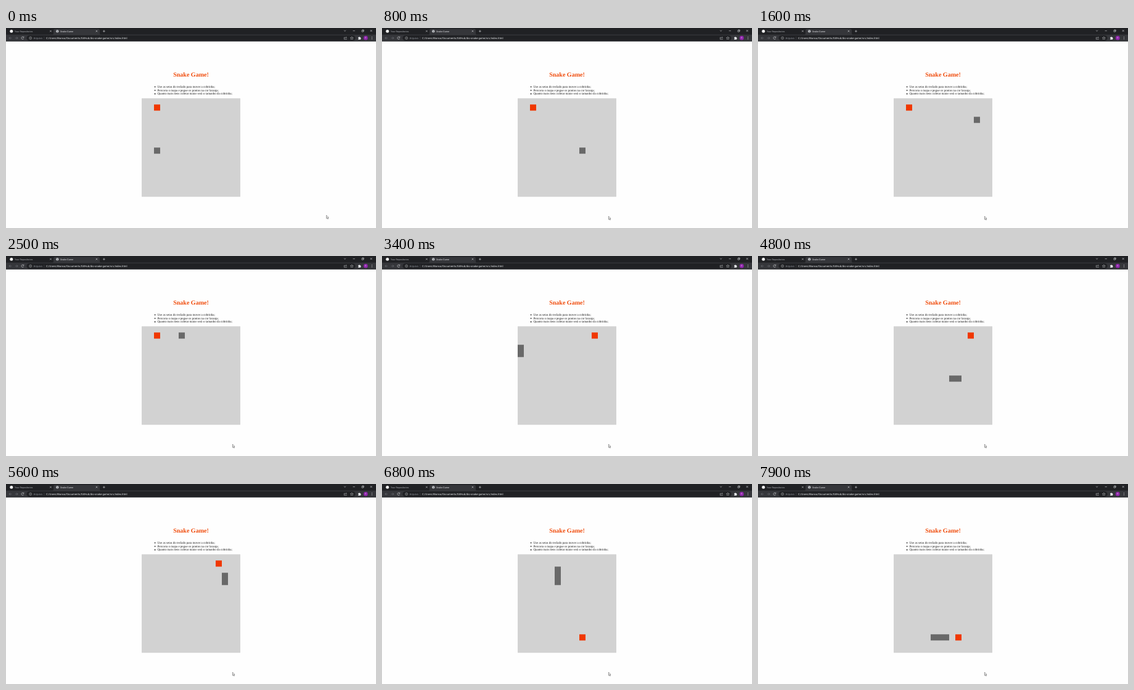
Animation of 600 by 325 pixels, one loop 8000 ms. Source, as an HTML page:

```html
<!DOCTYPE html>
<html lang="pt-BR">
<head>
<meta charset="utf-8">
<title>Snake Game</title>
<style>
  html, body { margin: 0; width: 100%; height: 100%; overflow: hidden; background: #fefefe; }
  svg { display: block; width: 600px; height: 325px; }
  text { text-rendering: geometricPrecision; }
  .ui { font-family: Roboto, "Open Sans", sans-serif; }
  .tab { font-size: 3.75px; }
  .url { font-size: 4.3px; }
  .page { font-family: "Liberation Serif", "Times New Roman", serif; font-size: 5px; fill: #111; }
  .title { font-size: 10px; font-weight: bold; fill: #f04c0c; text-anchor: middle; }
  .line { fill: none; stroke: #d5d7da; stroke-width: .6; }
  .dim { stroke: #75787c; }
</style>
</head>
<body>
<svg viewBox="0 0 600 325">
  <rect width="600" height="325" fill="#fefefe"/>

  <!-- tab strip -->
  <g class="ui">
    <rect width="600" height="22" fill="#202124"/>
    <path d="M75 11q2 0 2-2V4q0-2.5 2.5-2.5h70q2.5 0 2.5 2.5v5q0 2 2 2z" fill="#35363a"/>
    <circle cx="8.8" cy="5.3" r="2.5" fill="#f1f1f1"/>
    <text class="tab" x="14" y="6.7" textLength="" fill="#a9acb1">Your Repositories</text>
    <circle cx="83.3" cy="5.3" r="2.3" fill="#c3c6ca"/>
    <path d="M81.7 4.5l1.5.2.7 1-.8 1.2M84 3.5l.7 1.2" fill="none" stroke="#505257" stroke-width=".6"/>
    <text class="tab" x="88" y="6.7" fill="#e0e1e4">Snake Game</text>
    <g class="line">
      <path d="M71.2 3.9l2.5 2.5m0-2.5l-2.5 2.5M145.7 3.9l2.5 2.5m0-2.5l-2.5 2.5"/>
      <path d="M157 5.2h3.8m-1.9-1.9v3.8"/>
      <path d="M548 3.7l1.6 1.5 1.6-1.5M562.6 4.6h3.2M577 3.8h2.4v2.4h-2.4zM577.8 3.8v-.8h2.4v2.4h-.8M590.7 3l3 3m0-3l-3 3"/>
    </g>
  </g>

  <!-- toolbar -->
  <g class="ui">
    <rect y="10.7" width="600" height="11.3" fill="#35363a"/>
    <rect x="33.5" y="12" width="533" height="8.7" rx="4.35" fill="#202124"/>
    <path class="line dim" d="M9.3 16.3H5m2-2l-2 2 2 2M14.8 16.3h4.3m-2-2l2 2-2 2"/>
    <path class="line" d="M28.5 15a2 2 0 1 0 .3 1.9M28.9 13.8v1.6h-1.6"/>
    <g class="line" stroke-opacity=".8">
      <circle cx="39.7" cy="16.3" r="2"/>
      <path d="M39.7 15.9v1.4M39.7 14.9v.5"/>
      <path d="M549.8 15.2h-1.5v3.2h4v-1.2M549.8 17c.2-1.3 1-1.7 2.4-1.7m-1-1.2l1.2 1.2-1.2 1.2"/>
      <path d="M560.8 14l.7 1.5 1.7.2-1.2 1.1.3 1.7-1.5-.9-1.5.9.3-1.7-1.2-1.1 1.7-.2z"/>
    </g>
    <text class="url" x="44.5" y="17.9" fill="#8f949a">Arquivo</text>
    <path d="M61.8 14v4.6" stroke="#5f6368" stroke-width=".4"/>
    <text class="url" x="65" y="17.9" fill="#e8eaed">C:/Users/Bianca/Documents/GitHub/dio-snake-game/src/index.html</text>
    <path d="M571 15h1.2a.8.8 0 0 1 1.6 0h1.2v1.2a.8.8 0 0 1 0 1.6v1h-4v-1.1a.8.8 0 0 0 0-1.6z" fill="#e8eaed"/>
    <circle cx="583.3" cy="16.2" r="3.4" fill="#8e24aa"/>
    <text x="583.3" y="17.4" font-size="3.4" text-anchor="middle" fill="#e6cdec">B</text>
    <g fill="#d5d7da">
      <circle cx="593.4" cy="14.5" r=".5"/><circle cx="593.4" cy="16.2" r=".5"/><circle cx="593.4" cy="17.9" r=".5"/>
    </g>
    <rect y="21.4" width="600" height=".6" fill="#4a4b4f"/>
  </g>

  <!-- page -->
  <g class="page">
    <text class="title" x="300" y="78.7">Snake Game!</text>
    <circle cx="241.6" cy="95.6" r=".9"/>
    <circle cx="241.6" cy="101.3" r=".9"/>
    <circle cx="241.6" cy="107" r=".9"/>
    <text x="245.4" y="97">Use as setas do teclado para mover a cobrinha;</text>
    <text x="245.4" y="102.7">Percorra o mapa e pegue os pontos na cor laranja;</text>
    <text x="245.4" y="108.4">Quanto mais itens coletar maior será o tamanho da cobrinha;</text>
  </g>
  <g transform="translate(220 114.3)">
    <rect width="160" height="160" fill="#d2d2d2"/>
    <path id="snake" fill="#696969"/>
    <path id="food" fill="#f03800"/>
  </g>
  <path id="cursor" d="M0 0v5.1l1.2-1.1.9 2 .9-.4-.9-1.9h1.6z" fill="#fff" stroke="#333" stroke-width=".5"/>
</svg>
<script>
  const LOOP = 8000, TICK = 100, CELL = 10;
  const DIRS = { R: [1, 0], L: [-1, 0], U: [0, -1], D: [0, 1] };
  const MEALS = [29, 59];
  const FOODS = [[2, 1], [12, 1], [10, 13]];
  const [snake, food, cursor] = ["snake", "food", "cursor"].map(id => document.getElementById(id));

  // head position at every tick
  const trail = [[2, 8]];
  for (const leg of "R11 U7 L13 D7 R13 U7 L7 D12 R2".split(" ")) {
    const [dx, dy] = DIRS[leg[0]];
    for (let n = +leg.slice(1); n > 0; n--) {
      const [x, y] = trail[trail.length - 1];
      trail.push([x + dx, y + dy]);
    }
  }

  const square = ([x, y]) => `M${x * CELL} ${y * CELL}h${CELL}v${CELL}h-${CELL}z`;

  function draw(time) {
    const tick = Math.floor((time % LOOP) / TICK);
    const eaten = MEALS.filter(m => tick >= m).length;
    const body = trail.slice(Math.max(0, tick - eaten), tick + 1);
    snake.setAttribute("d", body.map(square).join(""));
    food.setAttribute("d", square(FOODS[eaten]));

    const p = Math.min(1, tick / 7);
    const ease = p * p * (3 - 2 * p);
    cursor.setAttribute("transform", `translate(${519.6 - 152.2 * ease} ${304.4 + 1.6 * ease})`);
  }

  const start = performance.now();
  function frame() {
    draw(performance.now() - start);
    requestAnimationFrame(frame);
  }
  frame();
</script>
</body>
</html>
```
